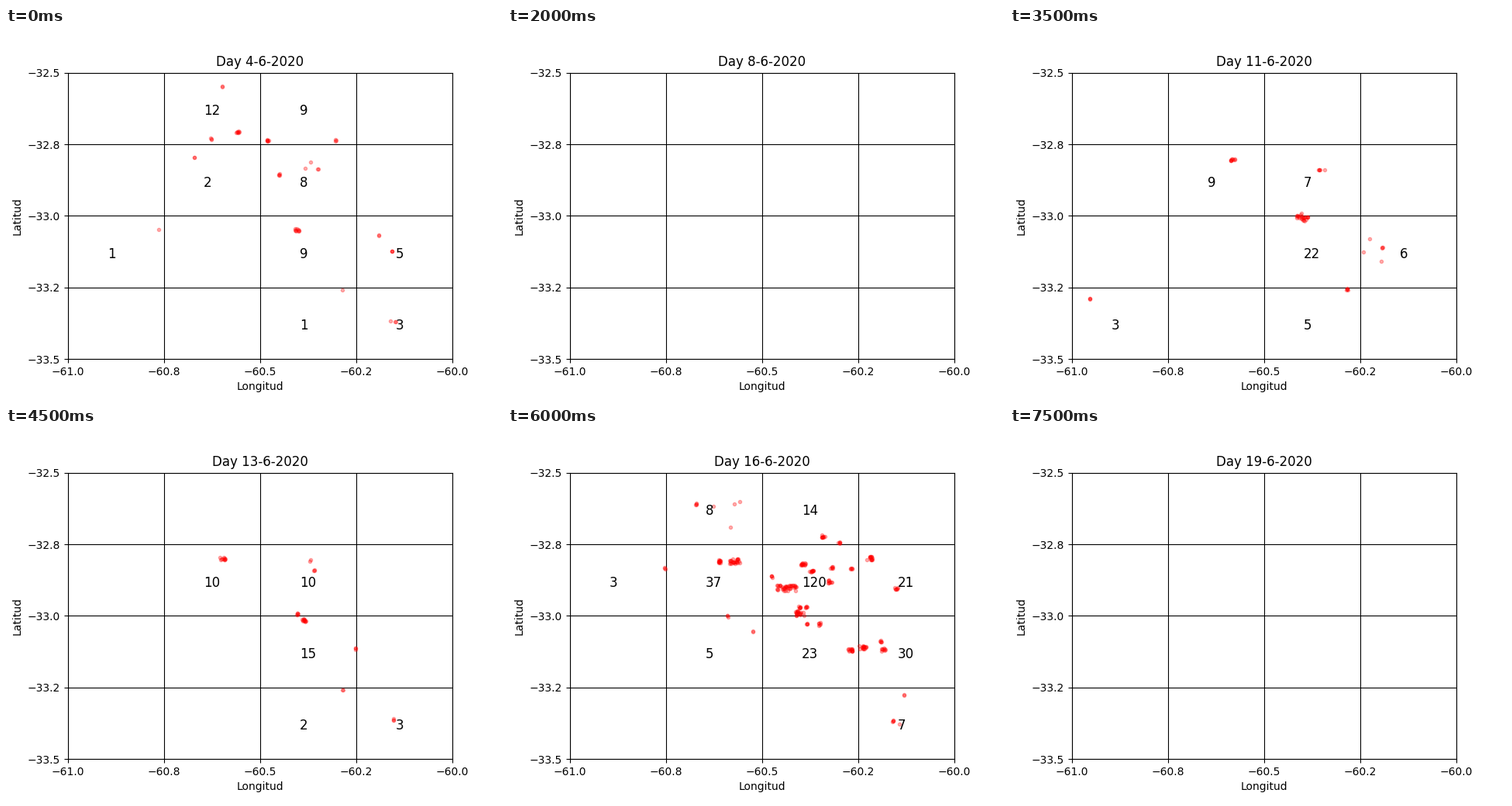
A matplotlib script that plays this animation: 640 px wide and 480 px high, repeating every 8 s.

```python
import matplotlib.pyplot as plt
import numpy as np
from matplotlib.animation import FuncAnimation

DAYS = range(4, 20)
LEFT, TOP, WIDTH, HEIGHT = 80, 57.6, 496, 369.6

# Spots per grid cell, row by row, on the key days.
NONE = [0] * 16
TOTALS = {
    4: [0, 12, 9, 0, 0, 2, 8, 0, 1, 0, 9, 5, 0, 0, 1, 3],
    6: [0] * 14 + [1, 0],
    7: NONE,
    8: NONE,
    11: [0] * 5 + [9, 7, 0, 0, 0, 22, 6, 3, 0, 5, 0],
    13: [0] * 5 + [10, 10, 0, 0, 0, 15, 0, 0, 0, 2, 3],
    15: [0, 12, 19, 0, 4, 35, 131, 18, 0, 2, 26, 38, 0, 0, 1, 14],
    17: [0, 4, 10, 0, 2, 40, 109, 24, 0, 8, 21, 22, 0, 0, 0, 1],
    18: NONE,
}

# Burning sites in pixels from a given day on; the largest of each cell first.
SITES = {
    4: [(298, 134), (264, 143), (278, 76), (337, 145), (425, 145), (243, 167),
        (352, 189), (402, 182), (385, 181), (392, 173), (196, 260), (375, 261),
        (498, 288), (481, 268), (433, 338), (502, 379), (495, 378)],
    9: [(287, 170), (398, 183), (375, 240), (405, 183), (380, 246), (371, 244),
        (480, 283), (455, 289), (463, 272), (478, 301), (103, 349), (434, 337)],
    13: [(279, 169), (375, 240), (397, 184), (392, 171), (383, 247), (386, 249),
         (450, 285), (434, 338), (500, 376)],
    14: [(243, 98), (291, 98), (264, 101), (298, 95), (286, 128), (407, 140),
         (427, 148), (202, 181), (295, 172), (274, 172), (364, 207), (379, 239),
         (381, 175), (392, 184), (416, 198), (418, 180), (376, 231), (443, 182),
         (385, 231), (340, 192), (467, 168), (501, 207), (283, 243), (316, 262),
         (443, 287), (402, 253), (386, 252), (459, 283), (485, 286), (481, 275),
         (434, 337), (497, 378), (510, 345), (504, 382)],
}


def totals(day):
    """Cell totals; in-between days are interpolated and lose the weakest cells."""
    if day in TOTALS:
        return TOTALS[day]
    keys = list(TOTALS)
    counts = [int(np.interp(day, keys, col)) for col in zip(*TOTALS.values())]
    return [n if n > 2 else 0 for n in counts]


def cell_of(x, y):
    return int((y - TOP) / HEIGHT * 4) * 4 + int((x - LEFT) / WIDTH * 4)


def share(n, parts):
    """Split n so that the k-th part is proportional to 1/k."""
    edges = np.cumsum(1 / np.arange(1, parts + 1))
    return np.diff(np.round(n * edges / edges[-1]), prepend=0).astype(int)


def build(day):
    rng = np.random.default_rng(day)
    counts = totals(day)
    sites = SITES[max(d for d in SITES if d <= day)]
    base = 0.35 if day < 14 else 0.18
    creep = 0.13 * max(day - 15, 0)  # older fires stretch westward
    xs, ys = [], []
    for cell, total in enumerate(counts):
        here = [s for s in sites if cell_of(*s) == cell]
        for (x, y), n in zip(here, share(total, len(here)) if here else []):
            if n:
                far = n - 1
                xs.extend(x + far * (rng.uniform(-1, 1, n) * (base + creep) - creep))
                ys.extend(y + 0.7 * far ** 0.5 * rng.uniform(-1, 1, n))
    lon = -61 + (np.array(xs) + 0.5 - LEFT) / WIDTH
    lat = -32.5 - (np.array(ys) - TOP) / HEIGHT
    return lon, lat, counts


scenes = [build(day) for day in DAYS]

fig, ax = plt.subplots(figsize=(6.4, 4.8), dpi=100)
ax.set(xlim=(-61, -60), ylim=(-33.5, -32.5),
       xticks=np.linspace(-61, -60, 5), yticks=np.linspace(-33.5, -32.5, 5))
for axis in (ax.xaxis, ax.yaxis):
    axis.set_major_formatter(lambda v, pos: f"{v:.1f}".replace("-", "\u2212"))
ax.grid(color="black", linestyle="-", linewidth=0.8)
ax.set_xlabel("Longitud")
ax.set_ylabel("Latitud", labelpad=4.72)
title = ax.set_title("")
spots, = ax.plot([], [], "r.", markersize=6, alpha=0.3)
labels = [ax.text(-61 + (c + 0.41) / 4, -32.5 - (r + 0.59) / 4, "", fontsize=12)
          for r in range(4) for c in range(4)]


def update(i):
    lon, lat, counts = scenes[i]
    spots.set_data(lon, lat)
    title.set_text(f"Day {DAYS[i]}-6-2020")
    for label, n in zip(labels, counts):
        label.set_text(str(n or ""))
    return [spots, title, *labels]


anim = FuncAnimation(fig, update, frames=len(DAYS), interval=500,
                     repeat=True, repeat_delay=0)
plt.show()
```
